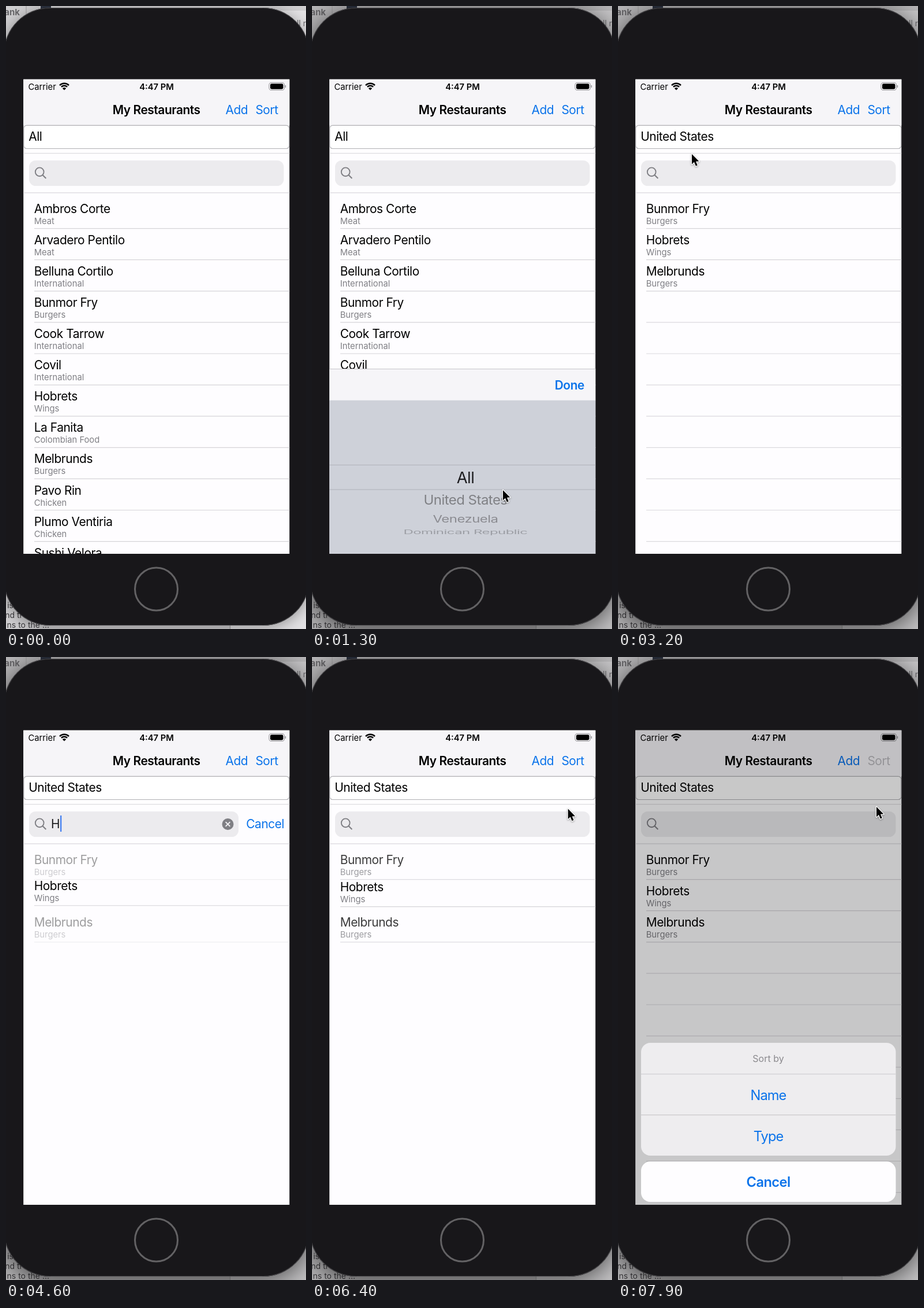
Write an HTML page with a canvas that moves like this. It is 520x1077 px and loops after 8000 ms.

```html
<!DOCTYPE html>
<html lang="en">
<head>
<meta charset="utf-8">
<title>Restaurant list</title>
<style>
html, body { margin: 0; width: 520px; height: 1077px; overflow: hidden; background: #cfced0; }
canvas { display: block; width: 520px; height: 1077px; }
</style>
</head>
<body>
<canvas id="stage"></canvas>
<script>
const W = 520, H = 1077, LOOP = 8000, STEP = 100;
const canvas = document.getElementById('stage');
const ctx = canvas.getContext('2d');
const dpr = window.devicePixelRatio || 1;
canvas.width = W * dpr;
canvas.height = H * dpr;

const BLUE = '#0a73ea', GRAY = '#7f7f84';
const FONT = 'Inter, Roboto, "Liberation Sans", sans-serif';
const SCREEN = { x: 30.2, y: 126.7, w: 461.1, h: 820.3 };
const BOTTOM = 947, PITCH = 54.1, QUERY = 'Hob';
const GAP = -0.44;

const places = [
  ['Ambros Corte', 'Meat'],
  ['Arvadero Pentilo', 'Meat'],
  ['Belluna Cortilo', 'International'],
  ['Bunmor Fry', 'Burgers'],
  ['Cook Tarrow', 'International'],
  ['Covil', 'International'],
  ['Hobrets', 'Wings'],
  ['La Fanita', 'Colombian Food'],
  ['Melbrunds', 'Burgers'],
  ['Pavo Rin', 'Chicken'],
  ['Plumo Ventiria', 'Chicken'],
  ['Sushi Velora', 'Japanese']
];
const countries = ['All', 'United States', 'Venezuela', 'Dominican Republic', 'Colombia'];

const ALL = places.map((_, i) => i), US = [3, 6, 8], FOUND = [6];
const filters = [
  { at: 1860, from: ALL, to: US },
  { at: 4520, from: US, to: FOUND },
  { at: 6160, from: FOUND, to: US }
];
const FILTER_MS = 310;

// time, x, y of the pointer tip
const path = [
  [200, 500, 420], [600, 405, 240], [800, 395, 237], [1000, 395, 237],
  [1300, 330, 835], [1600, 330, 795], [2000, 442, 693], [2200, 447, 686],
  [2400, 447, 686], [2600, 448, 670], [2800, 448, 670], [3200, 127, 254],
  [3400, 118, 283], [5200, 118, 283], [5600, 432, 279], [6000, 440, 282],
  [6200, 440, 282], [6900, 454, 174], [7100, 456, 181], [7600, 456, 181],
  [7700, 455, 192], [7900, 447, 257]
];

const clamp = v => Math.max(0, Math.min(1, v));
const span = (t, a, b) => clamp((t - a) / (b - a));
const smooth = u => u * u * (3 - 2 * u);
const easeOut = u => 1 - Math.pow(1 - u, 2.2);
const mix = (a, b, u) => a + (b - a) * u;

function text(s, x, mid, size, color, { weight = 400, align = 'left', gap = 0 } = {}) {
  ctx.font = `${weight} ${size}px ${FONT}`;
  ctx.letterSpacing = gap + 'px';
  ctx.textAlign = align;
  ctx.fillStyle = color;
  ctx.fillText(s, x, mid + size * 0.364);
}
const label = (s, x, mid, color = '#000', opts = {}) =>
  text(s, x, mid, 20.9, color, { gap: GAP, ...opts });

function rect(x, y, w, h, color) {
  ctx.fillStyle = color;
  ctx.fillRect(x, y, w, h);
}

function box(x, y, w, h, r, fill, stroke, width = 1) {
  ctx.beginPath();
  ctx.roundRect(x, y, w, h, r);
  if (fill) { ctx.fillStyle = fill; ctx.fill(); }
  if (stroke) { ctx.strokeStyle = stroke; ctx.lineWidth = width; ctx.stroke(); }
}

function line(x1, y1, x2, y2, color, width = 1.2) {
  ctx.beginPath();
  ctx.moveTo(x1, y1);
  ctx.lineTo(x2, y2);
  ctx.strokeStyle = color;
  ctx.lineWidth = width;
  ctx.stroke();
}

function disc(x, y, r, fill, stroke, width) {
  box(x - r, y - r, 2 * r, 2 * r, r, fill, stroke, width);
}

function clipTo(x, y, w, h) {
  ctx.beginPath();
  ctx.rect(x, y, w, h);
  ctx.clip();
}

function drawDesktop(active) {
  rect(0, 0, W, H, active ? '#b9b8ba' : '#cfced0');
  rect(389, 8, W - 389, H - 8, active ? '#c9c8ca' : '#e2e1e3');
  line(35, 0, 35, 40, '#a5a4a6');
  rect(60, 0, 18, 5, '#2c3240');
  line(388.5, 1060, 388.5, H, '#a09fa1');
  text('ank', 24, 11, 15, '#69686b', { weight: 700, align: 'right' });
  text('ll r', 504, 30, 14, '#6d6c6f');
  const notes = [['is', 13, 1036], ['nd ti', 27, 1053], ['ns to the ...', 75, 1070]];
  for (const [s, x, y] of notes) text(s, x, y, 14, '#3b3a3d', { align: 'right' });
}

function drawPhone(active) {
  ctx.save();
  ctx.shadowColor = active ? 'rgba(0,0,0,.62)' : 'rgba(0,0,0,.35)';
  ctx.shadowBlur = (active ? 46 : 24) * dpr;
  ctx.shadowOffsetY = (active ? 8 : 4) * dpr;
  box(-4, 3, 530, 1068, 80, '#18171a');
  ctx.restore();
  box(-3.5, 3.5, 529, 1067, 80, null, '#4b4a4d', 1);
  disc(260.5, 1008, 37, null, '#636264', 3);
}

function drawStatus() {
  text('Carrier', 38.5, 139.5, 14.75, '#000');
  text('4:47 PM', 261, 139.5, 14.75, '#000', { weight: 600, align: 'center' });
  ctx.strokeStyle = '#000';
  ctx.lineWidth = 2.5;
  for (const r of [11.3, 7.2]) {
    ctx.beginPath();
    ctx.arc(101, 145, r, -Math.PI * 0.75, -Math.PI * 0.25);
    ctx.stroke();
  }
  ctx.beginPath();
  ctx.moveTo(101, 145.5);
  ctx.arc(101, 145.5, 4.4, -Math.PI * 0.75, -Math.PI * 0.25);
  ctx.fillStyle = '#000';
  ctx.fill();
  box(456, 132.5, 26.5, 13, 4, null, '#98979b', 1.1);
  box(458, 134.3, 22.5, 9.4, 2.4, '#000');
  box(483.6, 136.8, 1.6, 4.4, 1, '#98979b');
}

function drawNav(t) {
  rect(30, 126, 462, 80, '#f6f5f8');
  drawStatus();
  label('My Restaurants', 260.7, 179, '#000', { weight: 600, align: 'center' });
  label('Add', 380.5, 179, BLUE);
  const sort = t < 7600 ? BLUE : t < 7700 ? '#e6e5e8' : '#bbbabf';
  label('Sort', 432.4, 179, sort);
}

function drawFields(t) {
  box(30.9, 206.3, 459.9, 40.2, 5, '#fff', '#b0b0b4', 1.2);
  label(t < 1900 ? 'All' : 'United States', 39.2, 225.5);
  line(30, 254.6, 492, 254.6, '#dddce0');
  line(30, 322.8, 492, 322.8, '#dad9dd');

  const open = smooth(span(t, 4060, 4300)) * (1 - smooth(span(t, 6140, 6400)));
  box(40, 267, mix(441.5, 363, open), 44, 11.5, '#ecebee');
  disc(58.2, 286.8, 7.4, null, GRAY, 1.9);
  line(63.6, 292.2, 69.3, 298, GRAY, 2.1);
  if (open > 0) {
    ctx.globalAlpha = open;
    label('Cancel', 416.3, 288.5, BLUE);
    ctx.globalAlpha = 1;
  }

  const typed = t < 4500 || t >= 6200 ? '' : QUERY.slice(0, 1 + Math.floor((t - 4500) / 200));
  const selected = t >= 5300 && t < 6200;
  if (selected) rect(75.5, 272.5, 44, 29.5, '#b9cbdc');
  if (typed) {
    label(typed, 78, 288.5, '#1c1c1e');
    disc(384.5, 289, 10, GRAY);
    line(380.6, 285.1, 388.4, 292.9, '#f2f1f4', 1.9);
    line(388.4, 285.1, 380.6, 292.9, '#f2f1f4', 1.9);
  }
  if (t >= 3800 && t < 5300) {
    ctx.font = `400 20.9px ${FONT}`;
    ctx.letterSpacing = GAP + 'px';
    const x = typed ? 79 + ctx.measureText(typed).width : 76.5;
    rect(x, 274, 2.2, 28, '#3d7cf0');
  }
}

function drawRow(id, slot, alpha) {
  const y = slot * PITCH;
  ctx.globalAlpha = alpha;
  label(places[id][0], 48.7, 350 + y);
  text(places[id][1], 48.7, 371.3 + y, 14.75, GRAY);
  line(49, 384.6 + y, 492, 384.6 + y, '#d5d4d8');
  ctx.globalAlpha = 1;
}

function drawList(t) {
  ctx.save();
  clipTo(30, 323.5, 462, 624);
  const now = filters.filter(f => t >= f.at).pop() || { at: -1e4, from: ALL, to: ALL };
  const u = span(t, now.at, now.at + FILTER_MS);
  for (const id of ALL) {
    const a = now.from.indexOf(id), b = now.to.indexOf(id);
    if (a < 0 && b < 0) continue;
    if (b < 0) drawRow(id, a, clamp(1 - u * 2.4));
    else drawRow(id, a < 0 ? b : mix(a, b, smooth(u)), a < 0 ? u : 1);
  }
  if (u === 1) {
    for (let i = now.to.length; i < 11; i++) {
      const y = 384.6 + i * PITCH;
      line(49, y, 492, y, '#dbdade');
    }
  }
  ctx.restore();
}

function drawWheel(mid, pos) {
  const R = 104, turn = 0.38, top = mid - 21.5, h = 42.5;
  const reel = (size, color, fade) => countries.forEach((name, i) => {
    const angle = (i - pos) * turn;
    if (Math.abs(angle) > 1.45) return;
    ctx.save();
    ctx.translate(266, mid + R * Math.sin(angle));
    ctx.scale(1, Math.cos(angle));
    ctx.globalAlpha = fade ? 0.3 + 0.7 * Math.cos(angle) : 1;
    text(name, 0, 0, size, color, { align: 'center', gap: -0.55 });
    ctx.restore();
  });
  ctx.save();
  ctx.beginPath();
  ctx.rect(30, mid - 120, 462, top - mid + 120);
  ctx.rect(30, top + h, 462, 120);
  ctx.clip();
  reel(24, '#7a7b80', true);
  ctx.restore();
  ctx.save();
  clipTo(30, top, 462, h);
  reel(27.5, '#1d1d20', false);
  ctx.restore();
  line(30, top, 492, top, '#b0b2b9');
  line(30, top + h, 492, top + h, '#b0b2b9');
}

function drawPicker(t) {
  const up = easeOut(span(t, 840, 1140)) * (1 - easeOut(span(t, 2860, 3140)));
  if (up <= 0) return;
  const top = mix(BOTTOM, 627, up);
  rect(30, top, 462, 55, '#f6f5f8');
  line(30, top + 0.5, 492, top + 0.5, '#c6c5ca');
  rect(30, top + 54.7, 462, 270, '#ced1d9');
  ctx.globalAlpha = t >= 2800 ? 0.35 : 1;
  label('Done', 420.7, top + 28, BLUE, { weight: 600 });
  ctx.globalAlpha = 1;
  drawWheel(top + 188, smooth(span(t, 1300, 1780)));
}

function drawSheet(t) {
  const u = smooth(span(t, 7650, 7900));
  if (u <= 0) return;
  rect(30, 126, 462, 822, `rgba(0,0,0,${0.215 * u})`);
  ctx.save();
  ctx.translate(0, 285 * (1 - u));
  box(40, 667, 441.5, 195, 16, '#eeedef');
  line(40, 721, 481.5, 721, '#c9c8cb');
  line(40, 791.7, 481.5, 791.7, '#c9c8cb');
  box(40, 872, 441.5, 70, 16, '#fefdff');
  const action = (s, y, opts) => text(s, 260.5, y, 23.7, BLUE, { align: 'center', ...opts });
  text('Sort by', 260.5, 694.5, 16, '#8b8a8e', { align: 'center' });
  action('Name', 757, { gap: -0.95 });
  action('Type', 828, { gap: -0.95 });
  action('Cancel', 907.5, { gap: -0.6, weight: 600 });
  ctx.restore();
}

function drawPointer(t) {
  if (t < path[0][0] || (t >= 4500 && t < 5200)) return;
  let i = path.findIndex(p => p[0] > t);
  if (i < 0) i = path.length;
  const a = path[i - 1], b = path[i] || a;
  const u = a === b ? 0 : smooth(span(t, a[0], b[0]));
  ctx.save();
  ctx.translate(mix(a[1], b[1], u) + 1, mix(a[2], b[2], u) + 2);
  ctx.beginPath();
  const arrow = [0, 0, 0, 17.5, 4, 13.8, 6.8, 20.6, 9.8, 19.4, 7, 12.8, 12.4, 12.6];
  for (let k = 0; k < arrow.length; k += 2) ctx.lineTo(arrow[k], arrow[k + 1]);
  ctx.closePath();
  ctx.lineJoin = 'round';
  ctx.shadowColor = 'rgba(0,0,0,.35)';
  ctx.shadowBlur = 3 * dpr;
  ctx.shadowOffsetY = dpr;
  ctx.strokeStyle = '#fff';
  ctx.lineWidth = 2.6;
  ctx.stroke();
  ctx.shadowColor = 'transparent';
  ctx.fillStyle = '#000';
  ctx.fill();
  ctx.restore();
}

function draw(t) {
  ctx.setTransform(dpr, 0, 0, dpr, 0, 0);
  const active = t >= 100;
  drawDesktop(active);
  drawPhone(active);
  ctx.save();
  clipTo(SCREEN.x, SCREEN.y, SCREEN.w, SCREEN.h);
  rect(30, 126, 462, 822, '#fefdff');
  drawList(t);
  drawNav(t);
  drawFields(t);
  drawPicker(t);
  drawSheet(t);
  ctx.restore();
  drawPointer(t);
}

// the picture advances ten times a second
let start = null;
function tick(now) {
  if (start === null) start = now;
  const t = (now - start + 20) % LOOP;
  draw(Math.floor(t / STEP) * STEP);
  requestAnimationFrame(tick);
}
draw(0);
requestAnimationFrame(tick);
</script>
</body>
</html>
```
